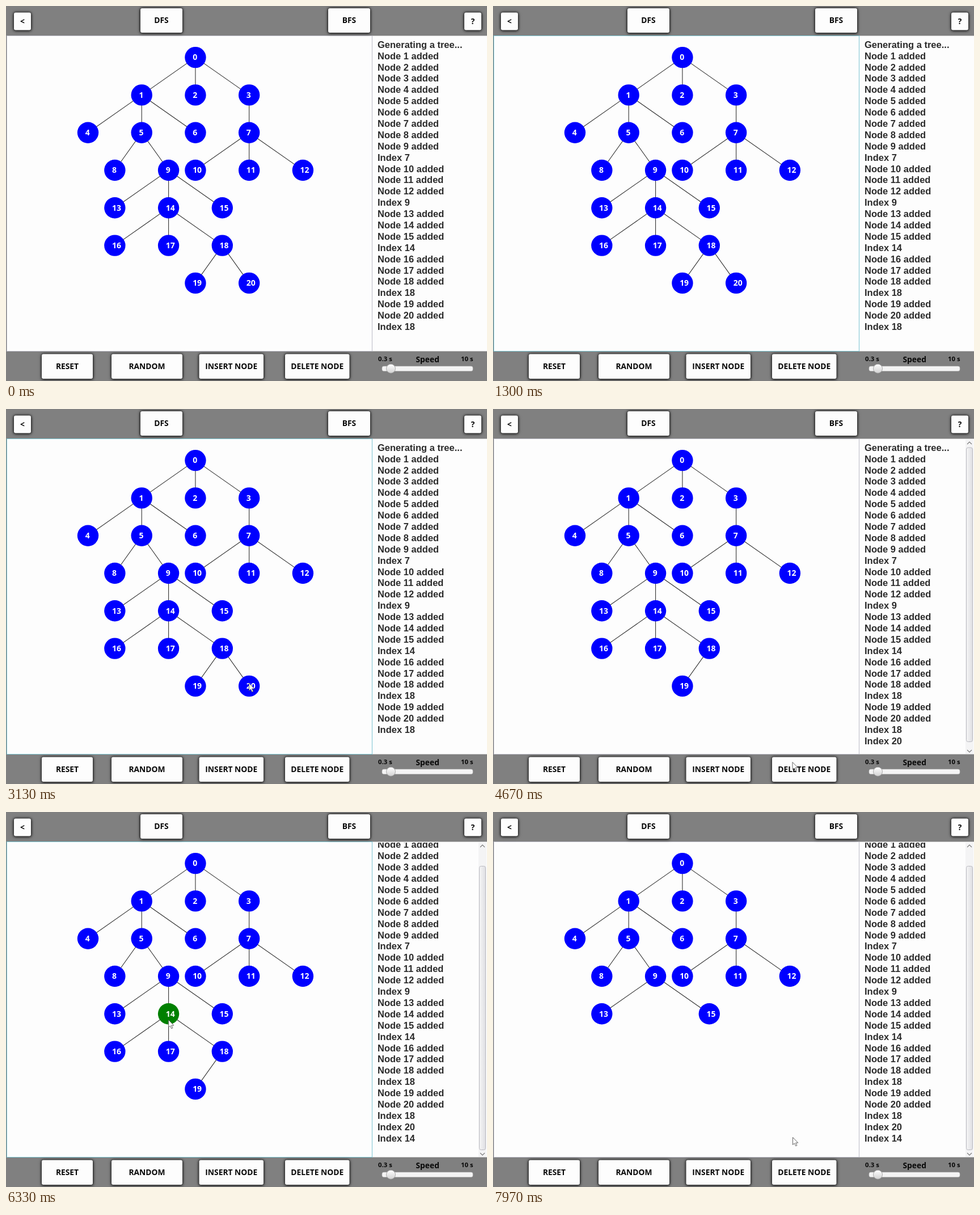
Recreate the animation shown at these times as an HTML page. Size 848 by 661 pixels, loop 8 s.

```html
<!DOCTYPE html>
<html lang="en">
<head>
<meta charset="utf-8">
<title>Tree editor</title>
<style>
  html, body { margin: 0; width: 100%; height: 100%; overflow: hidden; background: #808080; }
  svg { display: block; width: 848px; height: 661px; }
  text { font: bold 13.8px "Open Sans", "Noto Sans", sans-serif; fill: #080808; }
  .mid { text-anchor: middle; }
  .small { font-size: 11.4px; }
  #log text { font: bold 16.5px "Liberation Sans", Arial, sans-serif; fill: #2b2b2b; }
  .button { fill: #fdfdfd; filter: drop-shadow(0 0 2px #111) drop-shadow(0 1px 2px #333); }
  .edge { stroke: #333; stroke-width: 1.1; }
  .node circle { fill: #00f; }
  .node.picked circle { fill: #008000; }
  .node text { fill: #fff; font-size: 14px; }
</style>
</head>
<body>
<svg viewBox="0 0 848 661">
  <defs>
    <clipPath id="logClip"><rect x="647" y="54" width="200" height="554"/></clipPath>
    <linearGradient id="knob" x2="0" y2="1">
      <stop stop-color="#fff"/><stop offset="1" stop-color="#d2d2d2"/>
    </linearGradient>
    <linearGradient id="bar">
      <stop stop-color="#f6f6f6"/><stop offset="1" stop-color="#dedee2"/>
    </linearGradient>
  </defs>
  <rect width="848" height="661" fill="#808080"/>
  <rect x="646" y="52.5" width="202" height="556" fill="#fdfdfd"/>
  <rect id="canvas" x="1.5" y="52.5" width="644" height="556" fill="#fdfdfd"/>
  <g id="edges"></g>
  <g id="nodes"></g>
  <g clip-path="url(#logClip)"><g id="log"></g></g>
  <g id="scrollbar">
    <rect x="833" y="54" width="14" height="554" fill="#f4f4f5"/>
    <rect id="thumb" x="834.5" width="11" rx="3" fill="url(#bar)" stroke="#b9b9c0"/>
    <path d="M836 62l4-4 4 4M836 601l4 4 4-4" fill="none" stroke="#777" stroke-width="1.1"/>
  </g>
  <g id="buttons"></g>
  <text class="small" x="656" y="626">0.3 s</text>
  <text x="722.5" y="628">Speed</text>
  <text class="small" x="802" y="626">10 s</text>
  <rect x="663" y="635" width="160" height="8.5" rx="3" fill="#f4f4f4" stroke="#c4c4c4" stroke-width=".6"/>
  <circle cx="678.5" cy="639.2" r="8" fill="url(#knob)" stroke="#999" stroke-width=".8"/>
  <path id="cursor" d="M0 0V13l3-2.6 2.2 4.8 2.2-1-2.2-4.6H9.3Z" fill="#fff" stroke="#555" stroke-width=".9"/>
</svg>
<script>
const LOOP = 8000;
const PICK_20 = 3400, DELETE_20 = 4550, PICK_14 = 5950, DELETE_14 = 7350;
const FOCUS = 1000;
const ROW = 19.89;

const byId = id => document.getElementById(id);
function add(parent, tag, attrs, label) {
  const el = document.createElementNS("http://www.w3.org/2000/svg", tag);
  for (const key in attrs) el.setAttribute(key, attrs[key]);
  if (label !== undefined) el.textContent = label;
  return parent.appendChild(el);
}
const show = (el, on) => el.setAttribute("visibility", on ? "visible" : "hidden");

// Each node: parent, column, level.
const tree = [
  [-1, 4, 0], [0, 2, 1], [0, 4, 1], [0, 6, 1], [1, 0, 2], [1, 2, 2], [1, 4, 2],
  [3, 6, 2], [5, 1, 3], [5, 3, 3], [7, 4, 3], [7, 6, 3], [7, 8, 3],
  [9, 1, 4], [9, 3, 4], [9, 5, 4], [14, 1, 5], [14, 3, 5], [14, 5, 5],
  [18, 4, 6], [18, 6, 6]
];
const nodeX = i => 144.5 + 47.36 * tree[i][1];
const nodeY = i => 90.6 + 66.3 * tree[i][2];
const under = (i, root) => i === root || (i > 0 && under(tree[i][0], root));

const nodes = tree.map(([parent], i) => {
  const x = nodeX(i), y = nodeY(i);
  const edge = parent >= 0 && add(byId("edges"), "line",
    { class: "edge", x1: nodeX(parent), y1: nodeY(parent), x2: x, y2: y });
  const group = add(byId("nodes"), "g", { class: "node" });
  add(group, "circle", { cx: x, cy: y, r: 18.7 });
  add(group, "text", { x: x - 4.8, y: y + 4.8 }, i);
  const end = i === 20 ? DELETE_20 : under(i, 14) ? DELETE_14 : LOOP;
  return { group, edge, end };
});

// Log: added nodes, with an index line after some of them.
const indexAfter = { 9: 7, 12: 9, 15: 14, 18: 18, 20: 18 };
const lines = ["Generating a tree..."];
for (let i = 1; i <= 20; i++) {
  lines.push(`Node ${i} added`);
  if (i in indexAfter) lines.push(`Index ${indexAfter[i]}`);
}
lines.push("Index 20", "Index 14");
const rows = lines.map((line, i) => add(byId("log"), "text", { x: 655, y: 73.8 + ROW * i }, line));

[
  ["<", 14, 11.5, 30, 31], ["DFS", 237, 4, 74, 43], ["BFS", 568, 4, 74, 43], ["?", 808, 11.5, 30, 31],
  ["RESET", 63, 613.5, 90, 43.5], ["RANDOM", 186, 613.5, 125, 43.5],
  ["INSERT NODE", 340.5, 613.5, 113.5, 43.5], ["DELETE NODE", 492, 613.5, 113.5, 43.5]
].forEach(([label, x, y, width, height]) => {
  add(byId("buttons"), "rect", { class: "button", x, y, width, height, rx: 3 });
  add(byId("buttons"), "text", { class: "mid", x: x + width / 2, y: y + height / 2 + 4.8 }, label);
});

// Pointer stops: time, x, y.
const path = [
  [2300, 480, 661], [2900, 428.5, 483.5], [3600, 428.5, 483.5], [4300, 528, 622.5], [4900, 528, 622.5],
  [5750, 286.5, 366.5], [6500, 286.5, 366.5], [7200, 528, 624], [7550, 528, 624], [7900, 528.5, 573.5], [LOOP, 528.5, 573.5]
];
function pointer(t) {
  const next = path.findIndex(stop => stop[0] > t);
  const [t0, x0, y0] = path[next - 1], [t1, x1, y1] = path[next];
  const u = (t - t0) / (t1 - t0), k = u * u * (3 - 2 * u);
  return [x0 + (x1 - x0) * k, y0 + (y1 - y0) * k];
}

function draw(t) {
  nodes.forEach(({ group, edge, end }) => {
    show(group, t < end);
    if (edge) show(edge, t < end);
  });
  nodes[20].group.classList.toggle("picked", t >= PICK_20);
  nodes[14].group.classList.toggle("picked", t >= PICK_14);

  const focused = (t >= FOCUS && t < DELETE_20) || (t >= PICK_14 && t < DELETE_14);
  byId("canvas").setAttribute("stroke", focused ? "#7cc4d2" : "#bcbcc6");

  const scrolled = t >= PICK_14;
  show(rows[26], t >= PICK_20);
  show(rows[27], scrolled);
  byId("log").setAttribute("transform", `translate(0 ${scrolled ? -30.2 : 0})`);
  show(byId("scrollbar"), t >= PICK_20);
  byId("thumb").setAttribute("y", scrolled ? 95.5 : 68);
  byId("thumb").setAttribute("height", scrolled ? 500 : 518.5);

  const visible = t >= path[0][0];
  show(byId("cursor"), visible);
  if (visible) byId("cursor").setAttribute("transform", `translate(${pointer(t)})`);
}

const start = performance.now();
function tick() {
  draw((performance.now() - start) % LOOP);
  requestAnimationFrame(tick);
}
tick();
</script>
</body>
</html>
```
